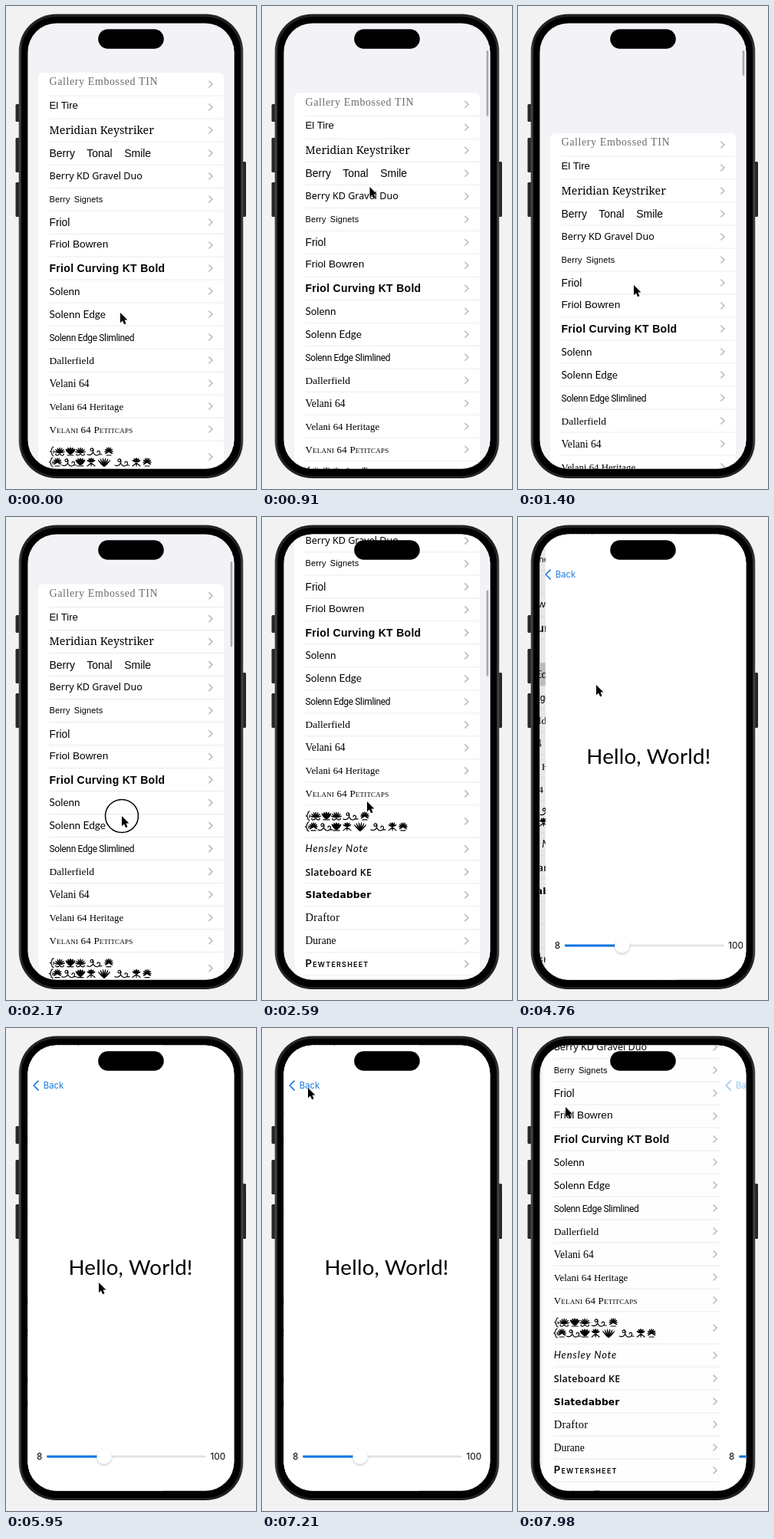
Recreate the animation shown at these times as an HTML page. Size 326 px wide and 630 px high, loop 8 s.

```html
<!DOCTYPE html>
<html lang="en">
<head>
<meta charset="utf-8">
<title>Font list</title>
<style>
  html, body { margin: 0; width: 100%; height: 100%; overflow: hidden; background: #f2f2f2; }
  svg { display: block; width: 326px; height: 630px; }
</style>
</head>
<body>
<svg viewBox="0 0 326 630">
  <defs>
    <clipPath id="screen"><rect x="28.4" y="22.5" width="269" height="581.1" rx="37.5"/></clipPath>
    <filter id="soft" x="-50%" y="-50%" width="200%" height="200%">
      <feDropShadow dx="0" dy="1.5" stdDeviation="1.8" flood-opacity=".25"/>
    </filter>
    <linearGradient id="rim" x2="1" y2="0">
      <stop offset="0" stop-color="#4a4a4c"/><stop offset=".015" stop-color="#222224"/>
      <stop offset=".985" stop-color="#222224"/><stop offset="1" stop-color="#4a4a4c"/>
    </linearGradient>
  </defs>
  <rect width="326" height="630" fill="#f2f2f2"/>
  <g fill="#262628">
    <rect x="12.5" y="128" width="6" height="23" rx="1.5"/>
    <rect x="12.5" y="172" width="6" height="45" rx="1.5"/>
    <rect x="12.5" y="230" width="6" height="45" rx="1.5"/>
    <rect x="307.5" y="203" width="5.5" height="72" rx="1.5"/>
  </g>
  <rect x="16.7" y="10.5" width="292.6" height="605.5" rx="49" fill="url(#rim)"/>
  <rect x="20" y="14" width="286" height="599" rx="46" fill="#000"/>
  <g clip-path="url(#screen)">
    <rect x="28" y="22" width="270" height="583" fill="#f2f2f7"/>
    <g id="list">
      <g id="rows">
        <rect x="42" y="87" width="242" height="900" rx="6" fill="#fff"/>
        <rect id="pick" x="42" y="387" width="242" height="30" fill="#cdcdd1"/>
      </g>
    </g>
    <rect id="dim" x="28" y="22" width="270" height="583"/>
    <rect id="bar" x="292.7" width="2.6" rx="1.3" fill="#a9a9ad"/>
    <g id="page">
      <rect x="28" y="22" width="270" height="583" fill="#fff"/>
      <text x="162.5" y="322" font-family="Lato, sans-serif" font-size="27.7" letter-spacing=".2" text-anchor="middle">Hello, World!</text>
      <g font-family="Inter, sans-serif" font-size="11.8">
        <text x="40" y="563.3">8</text>
        <text x="266.5" y="563.3">100</text>
      </g>
      <rect x="53" y="557.6" width="208" height="2.8" rx="1.4" fill="#e4e4e6"/>
      <rect x="53" y="557.6" width="75" height="2.8" rx="1.4" fill="#0a74e6"/>
      <circle cx="128" cy="559" r="9.6" fill="#fff" filter="url(#soft)"/>
    </g>
    <g id="back">
      <path d="M42 69.2L36.2 75L42 80.8" fill="none" stroke="#1678dc" stroke-width="1.7" stroke-linecap="round" stroke-linejoin="round"/>
      <text x="48.8" y="79" font-family="Inter, sans-serif" font-size="11.3" fill="#1678dc">Back</text>
    </g>
  </g>
  <rect x="120.2" y="30.3" width="85.6" height="25.4" rx="12.7"/>
  <circle id="ring" r="21.5" fill="none" stroke="#000" stroke-width="1.5"/>
  <path id="cursor" d="M0 0V13.2L3 10.4L5.1 15.2L7.5 14.2L5.5 9.5H9.4Z" stroke="#fff" stroke-width=".9" paint-order="stroke"/>
</svg>
<script>
const NS = 'http://www.w3.org/2000/svg';
const $ = id => document.getElementById(id);

function add(parent, tag, attrs, text) {
  const el = document.createElementNS(NS, tag);
  for (const k in attrs) el.setAttribute(k, attrs[k]);
  if (text) el.textContent = text;
  parent.appendChild(el);
  return el;
}

const SANS = "'Liberation Sans', sans-serif", SERIF = "'Liberation Serif', serif",
  NOTO = "'Noto Serif', serif", HUMAN = "'Noto Sans', sans-serif", LATO = 'Lato, sans-serif',
  OPEN = "'Open Sans', sans-serif", WIDE = "'DejaVu Sans', sans-serif",
  MONO = "'Liberation Mono', monospace";

// name, family, size, baseline below the row centre, extra style
const ROWS = [
  ['Gallery Embossed TIN', SERIF, 14, 1.3, 'fill:#6c6c6c;letter-spacing:.6px'],
  ['El Tire', SANS, 13.2, 2],
  ['Meridian Keystriker', NOTO, 14.2, 4.5],
  ['Berry Tonal Smile', SANS, 14, 5, 'word-spacing:11.6px'],
  ['Berry KD Gravel Duo', HUMAN, 12.6, 3.8],
  ['Berry Signets', SANS, 11, 3.5, 'word-spacing:2px;letter-spacing:.15px'],
  ['Friol', SANS, 13.8, 5],
  ['Friol Bowren', SANS, 13.7, 3],
  ['Friol Curving KT Bold', SANS, 14, 5, 'font-weight:700;letter-spacing:.3px'],
  ['Solenn', LATO, 13.4, 4.5],
  ['Solenn Edge', LATO, 13.6, 4.5],
  ['Solenn Edge Slimlined', 'Roboto, sans-serif', 12, 4.5, 'letter-spacing:-.35px'],
  ['Dallerfield', SERIF, 13.5, 4.5],
  ['Velani 64', SERIF, 13.7, 4.5],
  ['Velani 64 Heritage', SERIF, 12.9, 4.5],
  ['Velani 64 Petitcaps', SERIF, 13, 4.5, 'font-variant:small-caps;letter-spacing:.2px'],
  null,
  ['Hensley Note', LATO, 13, 4, 'font-style:italic;letter-spacing:.9px'],
  ['Slateboard KE', OPEN, 12.4, 5, 'font-weight:600;letter-spacing:.3px'],
  ['Slatedabber', WIDE, 12.3, 4.5, 'font-weight:700;letter-spacing:.1px'],
  ['Draftor', SERIF, 14.5, 4.5, 'letter-spacing:.3px'],
  ['Durane', SERIF, 13.6, 4.5],
  ['Pewtersheet', 'Inter, sans-serif', 13.2, 4, 'font-variant:small-caps;font-weight:600;letter-spacing:1.2px'],
  ['Porter Ten', MONO, 12.5, 5]
];

// ornaments: bracket, fan, rosette, lotus, leaf diamond, spray and scroll
const petals = (n, spread, y, length, rx = .85) => {
  let s = '';
  for (let i = 0; i < n; i++) {
    const a = (i / (n - 1) - .5) * spread;
    s += `<ellipse cy="${-length / 2}" rx="${rx}" ry="${length / 2}" transform="translate(0 ${y}) rotate(${a})"/>`;
  }
  return s;
};
const line = d => `<path d="${d}" fill="none" stroke="#000" stroke-width="1.2" stroke-linecap="round"/>`;
const foot = line('M-5 3C-6 6 -2 6 0 3C2 6 6 6 5 3');
const MOTIFS = {
  b: line('M2 -6C-2 -5 1 -1 -2 0C1 1 -2 5 2 6M2 -1V2'),
  f: petals(7, 150, 2, 7.5) + foot,
  r: petals(9, 240, 0, 6) + line('M-3 5H3'),
  l: petals(5, 80, 4, 9.5, 1.4) + line('M-4 5H4'),
  d: petals(5, 130, 0, 6, 1.1) + line('M-5 5L0 1L5 5M0 1V5'),
  v: petals(6, 85, 6, 12),
  s: line('M-9 4C-5 6 -1 3 -1 -1C-1 -5 -5 -5 -5 -2C-5 0 -2 0 -2 -2M-1 2C1 6 5 6 7 3C9 -1 4 -2 4 1M6 4H10')
};
function ornaments(parent, y, marks) {
  for (const [kind, x] of marks)
    add(parent, 'g', { transform: `translate(${x} ${y})` }).innerHTML = MOTIFS[kind];
}

const rows = $('rows');
let top0 = 87;
for (const row of ROWS) {
  const h = row ? 30 : 42, mid = top0 + h / 2;
  if (row) {
    const [name, family, size, dy, style = ''] = row;
    add(rows, 'text', { x: 56.5, y: mid + dy, 'font-size': size, style: `font-family:${family};${style}` }, name);
  } else {
    ornaments(rows, mid - 7, [['b', 60], ['f', 70], ['l', 84], ['f', 97], ['s', 115], ['r', 134]]);
    ornaments(rows, mid + 7, [['b', 59], ['r', 67], ['s', 82], ['l', 97], ['d', 111], ['v', 128], ['s', 151], ['d', 170], ['r', 184]]);
  }
  add(rows, 'path', { d: `M264.8 ${mid - 4}L269 ${mid}L264.8 ${mid + 4}`, fill: 'none', stroke: '#b9b9bd', 'stroke-width': 1.5, 'stroke-linecap': 'round' });
  top0 += h;
  add(rows, 'path', { d: `M56 ${top0}H284`, stroke: '#e3e3e6', 'stroke-width': .7 });
}

// pointer path: time, x, y
const PATH = [
  [0, 149, 400], [140, 148, 331], [280, 148, 331], [560, 136, 181], [630, 136, 181],
  [1400, 151, 364], [1470, 151, 365], [1960, 151, 390], [2170, 151, 390], [2310, 137, 371],
  [3150, 137, 371], [3570, 97, 208], [3640, 84, 203], [3780, 95, 206], [4270, 95, 206],
  [4760, 102, 219], [5110, 103, 242], [5400, 221, 300], [5700, 180, 353], [5950, 121, 332],
  [6090, 129, 335], [6160, 129, 335], [6720, 80, 51], [7000, 62, 64], [7140, 57, 87],
  [7210, 60, 78], [7630, 60, 78], [7980, 62, 103], [8000, 62, 103]
];
const PRESSES = [[2100, 2240], [3920, 4340], [7560, 7700]];

const clamp = v => Math.max(0, Math.min(1, v));
function pointer(t) {
  let i = 1;
  while (t > PATH[i][0]) i++;
  const [t0, x0, y0] = PATH[i - 1], [t1, x1, y1] = PATH[i];
  const u = clamp((t - t0) / (t1 - t0)), e = u * u * (3 - 2 * u);
  return [x0 + (x1 - x0) * e, y0 + (y1 - y0) * e];
}

// share of the way left in a critically damped spring
const spring = (ms, rate) => {
  const s = Math.max(0, ms) * rate / 1000;
  return (1 + s) * Math.exp(-s);
};
const rubber = d => 581 * (1 - 1 / (d * .5 / 581 + 1));

function scroll(t) {
  if (t < 630) return 0;
  if (t <= 1470) return rubber(pointer(t)[1] - 181);
  if (t < 2200) return .5 + rubber(184) * spring(t - 1470, 13);
  return t < 3080 ? -197 * (1 - Math.exp(-(t - 2200) * .009)) : -197;
}

function pageShown(t) {
  if (t < 4270) return 0;
  return t < 7000 ? 1 - spring(t - 4270, 11) : spring(t - 7650, 11);
}

const move = (el, x, y) => el.setAttribute('transform', `translate(${x.toFixed(2)} ${y.toFixed(2)})`);
const fade = (el, o) => el.setAttribute('opacity', o.toFixed(3));

function draw(ms) {
  // the picture steps every 70 ms; the small lead absorbs timer jitter
  const t = Math.floor((ms + 10) / 70) * 70;
  const d = scroll(t), q = pageShown(t), pop = t > 7000, [x, y] = pointer(t);
  move(rows, 0, d);
  move($('list'), -80 * q, 0);
  fade($('dim'), .1 * q * q);
  fade($('pick'), t < 4130 ? 0 : pop ? q * q : 1);
  move($('page'), 268 * (1 - q), 0);
  move($('back'), pop ? 268 * (1 - q) : 0, 0);
  fade($('back'), pop ? q ** .4 : q);
  const bar = $('bar');
  fade(bar, t >= 700 && t < 4340 ? 1 : 0);
  bar.setAttribute('y', 58 + Math.max(0, -d) * .198);
  bar.setAttribute('height', 112 - Math.max(0, d));
  move($('cursor'), x, y);
  move($('ring'), x, y);
  fade($('ring'), PRESSES.some(([a, b]) => t >= a && t < b) ? 1 : 0);
}

const start = performance.now();
function tick() {
  draw((performance.now() - start) % 8000);
  requestAnimationFrame(tick);
}
tick();
</script>
</body>
</html>
```
